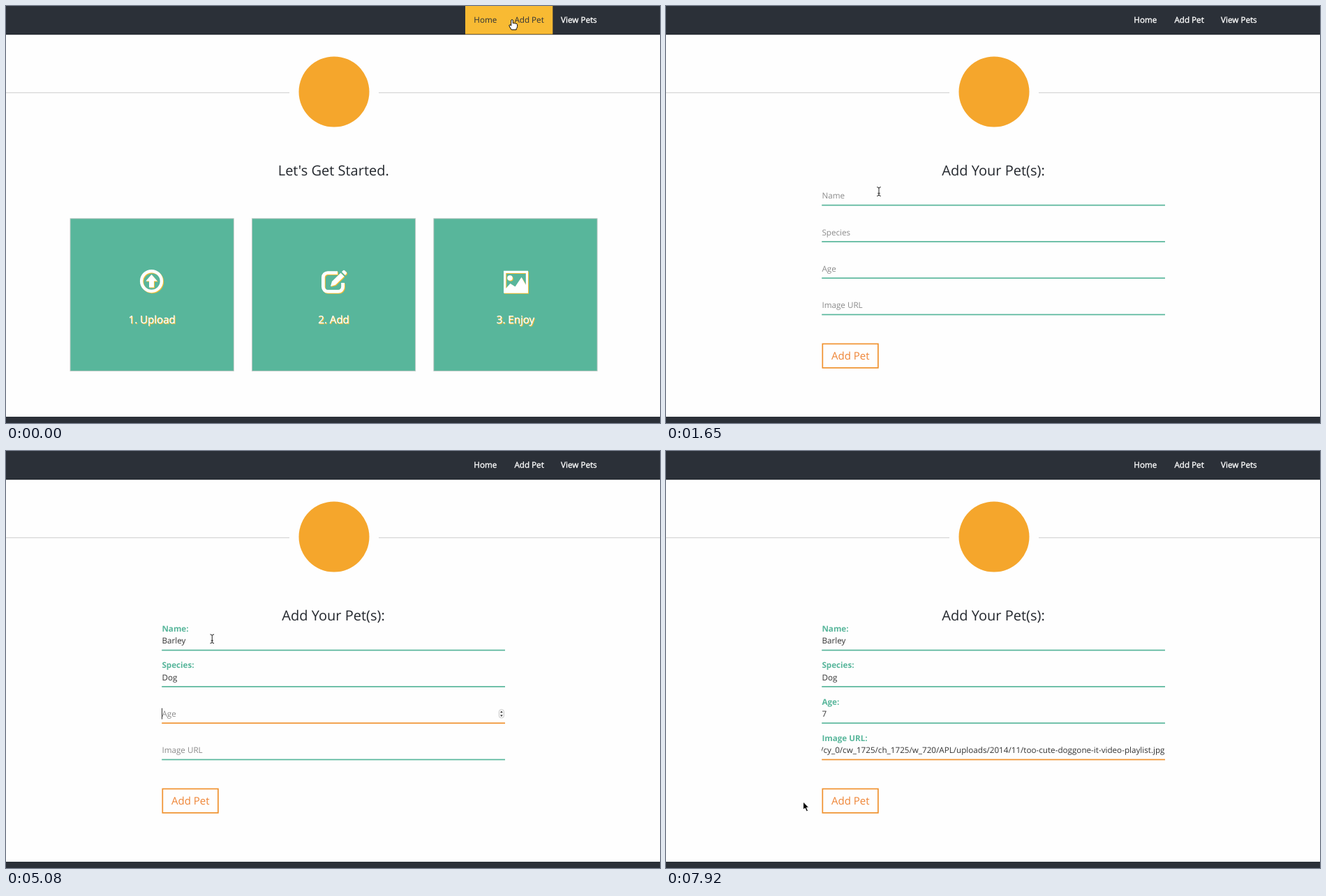
An HTML page for the animation above (8000 ms loop, 937 by 598 pixels).

```html
<!DOCTYPE html>
<html lang="en">
<head>
<meta charset="utf-8">
<title>Add Pet</title>
<style>
  html, body { margin: 0; width: 100%; height: 100%; overflow: hidden; background: #fefefe; }
  svg { display: block; width: 100vw; height: 100vh; }
  text {
    font: 11.66px "Open Sans", "Noto Sans", sans-serif;
    text-rendering: geometricPrecision;
    white-space: pre;
  }
  .nav { fill: #fff; stroke: #fff; stroke-width: .35px; }
  .nav.on { fill: #2b3038; stroke: none; }
  .title { font-size: 20.05px; fill: #24282e; text-anchor: middle; }
  .card text { font-size: 15.05px; fill: #fff; stroke: #fff; stroke-width: .3px; text-anchor: middle; }
  .glow { filter: drop-shadow(1.2px 1.1px 0 #f8bd32); }
  .label { font-weight: 700; fill: #58b69b; }
  .hint { fill: #8b8b8b; }
  .value { fill: #333; }
  .button { font-size: 15.05px; fill: #ef8536; }
</style>
</head>
<body>
<svg id="stage" viewBox="0 0 937 598" preserveAspectRatio="none">
  <defs><clipPath id="field"><rect x="223" y="240" width="492" height="210"/></clipPath></defs>

  <rect width="937" height="41" fill="#2b3038"/>
  <rect y="40.3" width="937" height=".9" fill="#20242a"/>
  <rect y="589" width="937" height="9" fill="#2b3038"/>
  <g id="nav"></g>

  <path d="M0 124.3H406M534 124.3H937" stroke="#ccc" stroke-width="1"/>
  <circle cx="470" cy="123" r="50.5" fill="#f5a62c"/>

  <g id="home">
    <text class="title" x="469.3" y="242.6">Let's Get Started.</text>
    <g id="cards"></g>
    <g class="glow" fill="#fff">
      <circle cx="208.5" cy="394.6" r="14.4" fill="none" stroke="#fff" stroke-width="4.4"/>
      <path d="M208.5 385L216.8 394.6H212V403.6H205V394.6H200.2Z"/>
    </g>
    <g class="glow" fill="#fff">
      <path d="M475 382.6H461A6.6 6.6 0 0 0 454.4 389.2V402.8A6.6 6.6 0 0 0 461 409.4H476A6.6 6.6 0 0 0 482.6 402.8V397"
            fill="none" stroke="#fff" stroke-width="4.8"/>
      <path d="M465 402L467 395L479.5 382.8L484.5 387.8L472 400Z"/>
      <path d="M481 381.2L483 379.2Q484.2 378.4 485.4 379.4L487.6 381.6Q488.6 382.8 487.8 384L485.8 386Z"/>
    </g>
    <path class="glow" fill="#fff" fill-rule="evenodd"
          d="M713 379.7H748V411.7H713ZM716.2 383H744.8V400L738.5 389L729.5 402.5L722.5 398L716.2 405ZM718.2 390a3.8 3.8 0 1 0 7.6 0a3.8 3.8 0 1 0 -7.6 0Z"/>
  </g>

  <g id="form">
    <text class="title" x="469.1" y="242.6">Add Your Pet(s):</text>
    <g id="fields"></g>
    <g id="spinner" fill="#fafafa" stroke="#bbb" stroke-width=".8">
      <rect x="706.4" y="370.8" width="7" height="12" rx="3"/>
      <path d="M708 375.3L709.9 372.8L711.8 375.3ZM708 378.5L709.9 381L711.8 378.5Z" fill="#333" stroke="none"/>
    </g>
    <rect id="caret" width="1" height="15.8" fill="#333"/>
    <rect x="224.3" y="484.5" width="79.6" height="34.4" fill="none" stroke="#f0922f" stroke-width="1.7"/>
    <text class="button" x="236.9" y="507.4">Add Pet</text>
  </g>

  <g id="cursor">
    <path data-kind="hand" fill="#fff" stroke="#000" stroke-width="1" stroke-linejoin="round"
          d="M-3.3 -6.2Q-2 -7.8 -.7 -6.2V-1.6Q.4 -2.4 1.6 -1.5Q2.8 -2 3.8 -1.1Q5.2 -1.4 5.6 0V3Q5.3 5 4.2 6V7.5H-2.8Q-5 4.6 -6.2 1.6Q-5.8 -.2 -4.2 .8L-3.3 1.8Z"/>
    <path data-kind="beam" fill="none" stroke="#222" stroke-width="1"
          d="M-2.8 -6.3Q0 -6.3 0 -4.3V4.5Q0 6.5 -2.8 6.5M2.8 -6.3Q0 -6.3 0 -4.3M0 4.5Q0 6.5 2.8 6.5M-1.6 2.6H1.6"/>
    <path data-kind="arrow" fill="#000" stroke="#fff" stroke-width="1"
          d="M0 0V11.6L2.7 9.2L4.9 14L7 13L4.9 8.4H8.3Z"/>
  </g>
</svg>
<script>
const LOOP = 8000;
const TEAL = "#58b69b", ORANGE = "#f0922f";
const LEFT = 223.4, RIGHT = 715, PITCH = 52.3;
const $ = id => document.getElementById(id);

function add(parent, tag, attrs, content = "") {
  const el = document.createElementNS("http://www.w3.org/2000/svg", tag);
  for (const key in attrs) el.setAttribute(key, attrs[key]);
  el.textContent = content;
  return parent.appendChild(el);
}
const show = (el, on) => { el.style.display = on ? "" : "none"; };
// Last entry whose start time has been reached
const latest = (list, t) => list.filter(item => item[0] <= t).pop();

// Navigation: label, box start, box end, text start, highlighted from/to
const nav = [
  ["Home", 658, 716, 670.3, 0, 150],
  ["Add Pet", 716, 783.3, 728.4, 0, 1200],
  ["View Pets", 783.3, 860, 795.1, 0, 0]
].map(([name, x0, x1, tx, from, to]) => ({
  from, to,
  box: add($("nav"), "rect", { x: x0, width: x1 - x0, height: 40.4, fill: "#f8ba33" }),
  text: add($("nav"), "text", { x: tx, y: 24 }, name)
}));

["1. Upload", "2. Add", "3. Enjoy"].forEach((name, i) => {
  const x = 92 + i * 260.4;
  const g = add($("cards"), "g", { class: "card" });
  add(g, "rect", { x, y: 304.8, width: 234.3, height: 218.6, fill: TEAL, stroke: "#c4c9c7", "stroke-width": .9 });
  add(g, "text", { class: "glow", x: x + 117.2, y: 454.7 }, name);
});

const path = "/cy_0/cw_1725/ch_1725/w_720/APL/uploads/2014/11/too-cute-doggone-it-video-playlist.jpg";
const fields = [
  { name: "Name", focus: 1800, fade: 150, typed: [[2400, "B"], [2850, "Ba"], [3000, "Bar"], [3150, "Barl"], [3440, "Barley"]] },
  { name: "Species", focus: 3740, fade: 0, typed: [[4330, "D"], [4630, "Do"], [4780, "Dog"]] },
  { name: "Age", focus: 5080, fade: 150, typed: [[5680, "7"]] },
  { name: "Image URL", focus: 6280, fade: 0, typed: [[7170, path]] }
];
fields.forEach((f, i) => {
  const dy = i * PITCH, g = $("fields");
  const clip = add(g, "g", { "clip-path": "url(#field)" });
  f.blur = i < 3 ? fields[i + 1].focus : LOOP;
  f.label = add(g, "text", { class: "label", x: LEFT, y: 259 + dy }, f.name + ":");
  f.hint = add(g, "text", { class: "hint", x: LEFT, y: 276.4 + dy }, f.name);
  f.value = add(clip, "text", { class: "value", y: 276.4 + dy });
  f.line = add(g, "rect", { x: 223.2, y: 284.8 + dy, width: RIGHT - 223.2, height: 1.7 });
  f.caretY = 264.2 + dy;
});

const pointer = [
  [0, 727, 26.5, "hand"], [150, 737, 26.5, "hand"], [300, 743.7, 26.5, "hand"],
  [1200, 690, 60, "arrow"], [1350, 535, 148, "arrow"], [1500, 375, 228, "arrow"],
  [1650, 305, 266, "beam"], [1800, 295.3, 269.3, "beam"],
  [7620, 218, 395, "arrow"], [7770, 155, 488, "arrow"], [7920, 196.5, 503, "arrow"]
];
const caretOff = [[6880, 7170], [7620, LOOP]];

function drawField(f, t) {
  const entry = latest(f.typed, t);
  const focused = t >= f.focus && t < f.blur;
  show(f.hint, !entry);
  show(f.label, entry);
  f.label.style.opacity = t < f.typed[0][0] + f.fade ? .5 : 1;
  f.line.setAttribute("fill", focused ? ORANGE : TEAL);

  const text = entry ? entry[1] : "";
  if (f.value.textContent !== text) f.value.textContent = text;
  const width = text ? f.value.getComputedTextLength() : 0;
  const x = Math.min(LEFT, RIGHT - .5 - width);
  f.value.setAttribute("x", x);
  if (focused) {
    $("caret").setAttribute("x", Math.min(Math.floor(x + width), RIGHT - 1));
    $("caret").setAttribute("y", f.caretY);
  }
}

function draw(t) {
  const onForm = t >= 600;
  show($("home"), !onForm);
  show($("form"), onForm);

  for (const item of nav) {
    const on = t >= item.from && t < item.to;
    show(item.box, on);
    item.text.setAttribute("class", on ? "nav on" : "nav");
  }

  if (onForm) {
    fields.forEach(f => drawField(f, t));
    show($("spinner"), t >= fields[2].focus && t < fields[2].blur);
    show($("caret"), t >= fields[0].focus && !caretOff.some(([a, b]) => t >= a && t < b));
  }

  const [, x, y, kind] = latest(pointer, t);
  $("cursor").setAttribute("transform", `translate(${x} ${y})`);
  for (const shape of $("cursor").children) show(shape, shape.dataset.kind === kind);
}

function tick() {
  draw(performance.now() % LOOP);
  requestAnimationFrame(tick);
}
tick();
</script>
</body>
</html>
```
